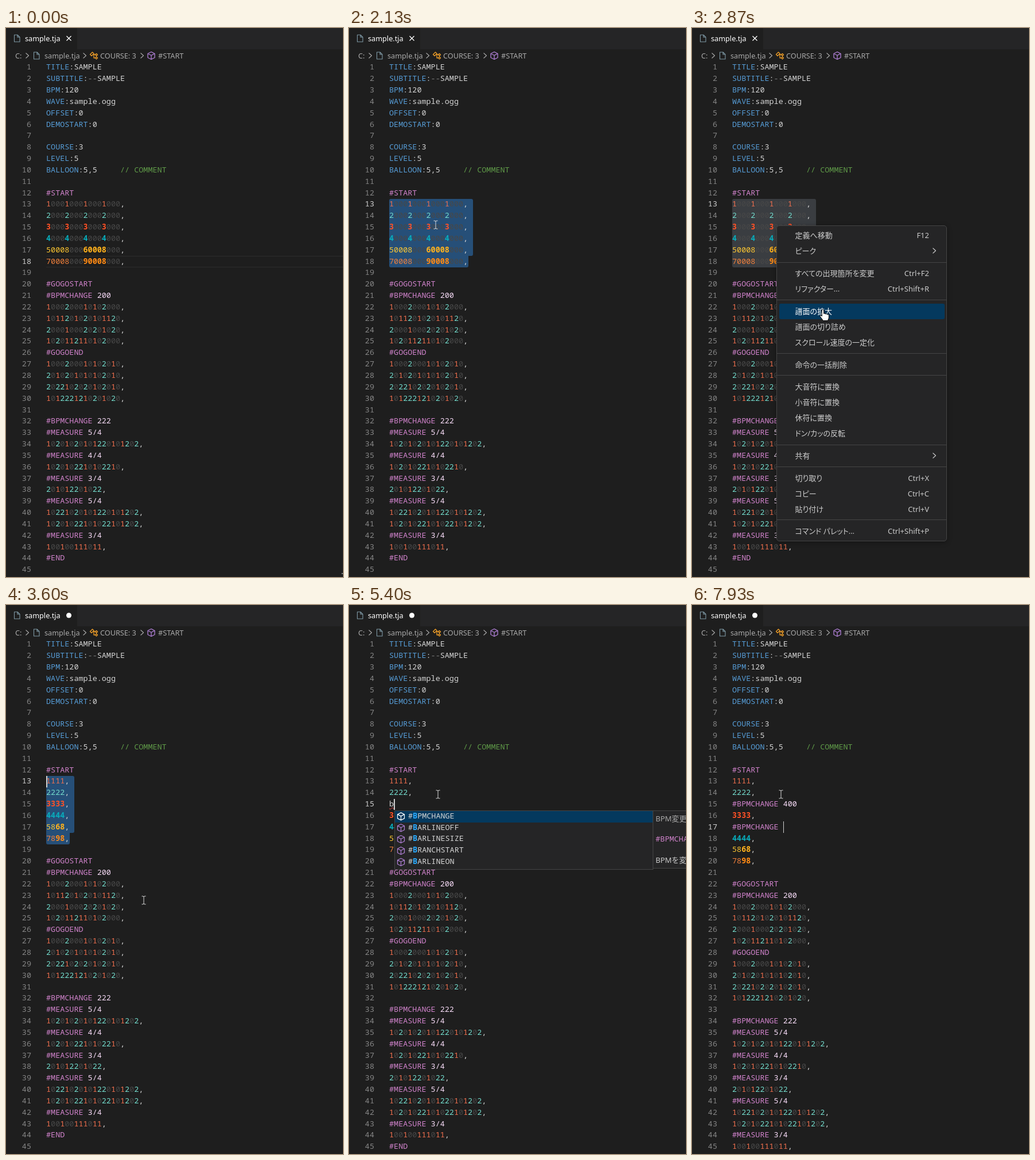
These frames come from a looping animation (587x954 px, 8000 ms). An HTML page:

```html
<!DOCTYPE html>
<html lang="ja">
<head>
<meta charset="utf-8">
<title>Editor</title>
<style>
html, body { margin: 0; width: 100%; height: 100%; overflow: hidden; background: #1e1e1e; }
#stage { position: relative; width: 587px; height: 954px; overflow: hidden; background: #1e1e1e; }
#stage div, #stage svg { position: absolute; white-space: pre; box-sizing: border-box; }
.mono { font: 500 13.45px/19.84px "Noto Sans Mono", monospace; color: #d4d4d4; }
.ui { font: 12.7px/20px "Noto Sans", "Noto Sans CJK JP", sans-serif; color: #a9a9a9; }
.item { font-size: 13px; color: #ccc; font-feature-settings: "palt"; }
.key { color: #569cd6; } .dash { color: #808080; } .comment { color: #5f9a48; }
.cmd { color: #cf82ca; } .arg { color: #f8dcf8; }
.bad { text-decoration: underline wavy #f14c4c 1px; }
.n0 { color: #484848; font-weight: 400; } .n1 { color: #f2704f; } .n2 { color: #74dccd; }
.n3 { color: #ff5126; font-weight: bold; } .n4 { color: #08aebd; font-weight: bold; }
.n5 { color: #ffc832; } .n6 { color: #ffb11c; font-weight: bold; }
.n7 { color: #f0803c; } .n9 { color: #ff8a14; font-weight: bold; }
.match { color: #2aaaff; font-weight: bold; }
.box { background: #252526; border: 1px solid #454545; }
</style>
</head>
<body>
<div id="stage"></div>
<script>
const stage = document.getElementById('stage');
const TICK = 1000 / 15, TICKS = 120;
const TOP = 58.9, ROW = 19.84, LEFT = 70, CHAR = 8.07;

const HEAD = `TITLE:SAMPLE
SUBTITLE:--SAMPLE
BPM:120
WAVE:sample.ogg
OFFSET:0
DEMOSTART:0

COURSE:3
LEVEL:5
BALLOON:5,5     // COMMENT

#START`.split('\n');
const NOTES = ['1000100010001000,', '2000200020002000,', '3000300030003000,',
  '4000400040004000,', '5000800060008000,', '7000800090008000,'];
const SHORT = NOTES.map(s => [...s].filter((c, i) => i % 4 === 0).join(''));
const TAIL = `
#GOGOSTART
#BPMCHANGE 200
1000200010102000,
1011201020101120,
2000100020201020,
1020112110102000,
#GOGOEND
1000200010102010,
2010201010102010,
2022102020102010,
1012221210201020,

#BPMCHANGE 222
#MEASURE 5/4
10201020101220101202,
#MEASURE 4/4
1020102210102210,
#MEASURE 3/4
201012201022,
#MEASURE 5/4
10221020101220101202,
10201022101022101202,
#MEASURE 3/4
100100111011,
#END
`.split('\n');

// [tick, text] for the two inserted lines
const FIRST = [[76, ''], [81, 'b'], [83, 'bp'], [84, 'bpm'], [89, '#BPMCHANGE '],
  [94, '#BPMCHANGE 4'], [95, '#BPMCHANGE 40'], [97, '#BPMCHANGE 400']];
const SECOND = [[105, ''], [112, 'b'], [113, 'bp'], [114, 'bpm'], [118, '#BPMCHANGE ']];
const COMMANDS = ['BPMCHANGE', 'BARLINEOFF', 'BARLINESIZE', 'BRANCHSTART', 'BARLINEON'];

// [tick, x, y] of the pointer
const PATH = [[0, 588, 955], [12, 224, 406], [17, 224, 406], [25, 62, 306], [28, 62, 306],
  [29, 59, 294], [32, 151, 342], [39, 151, 342], [40, 162, 366], [44, 240, 513],
  [58, 240, 513], [65, 155, 329], [120, 155, 329]];

// [centre y, label, shortcut]; '>' marks a submenu
const MENU = [[360, '定義へ移動', 'F12'], [387, 'ピーク', '>'],
  [426.5, 'すべての出現箇所を変更', 'Ctrl+F2'], [453.5, 'リファクター...', 'Ctrl+Shift+R'],
  [492, '譜面の拡大'], [519, '譜面の切り詰め'], [546, 'スクロール速度の一定化'],
  [585, '命令の一括削除'],
  [623, '大音符に置換'], [650, '小音符に置換'], [677, '休符に置換'], [704, 'ドン/カッの反転'],
  [743, '共有', '>'],
  [782, '切り取り', 'Ctrl+X'], [809, 'コピー', 'Ctrl+C'], [836, '貼り付け', 'Ctrl+V'],
  [874, 'コマンド パレット...', 'Ctrl+Shift+P']];
const RULES = [407, 472, 565, 603, 724, 762, 854];

const rowTop = row => TOP + row * ROW;
const colX = col => LEFT + col * CHAR;
const span = (cls, s) => `<span class="${cls}">${s}</span>`;
const block = (x, y, w, h, style = '', cls = '') =>
  `<div class="${cls}" style="left:${x}px;top:${y}px;width:${w}px;height:${h}px;${style}"></div>`;
const mono = (x, y, s) => `<div class="mono" style="left:${x}px;top:${y - 0.6}px">${s}</div>`;
const label = (x, cy, s, style = '', cls = '') =>
  `<div class="ui ${cls}" style="left:${x}px;top:${cy - 10.4}px;${style}">${s}</div>`;
const shape = (x, y, d, stroke, width = 1.1, fill = 'none') =>
  `<path transform="translate(${x} ${y})" d="${d}" stroke="${stroke}" stroke-width="${width}" fill="${fill}" stroke-linejoin="round"/>`;
const svg = s => `<svg width="587" height="954" style="left:0;top:0">${s}</svg>`;

const FILE = 'M-4.5-6h5.5l4 4v8h-9.5zM1-6v4h4';
const CHEVRON = 'M-2.5-4.5 2.5 0-2.5 4.5';
const CUBE = 'M0-6.5 6-3.5V3.5L0 6.5-6 3.5V-3.5ZM-6-3.5 0-.5 6-3.5M0-.5V6.5';
const TREE = 'M-6.5-2l4-4 2.5 2.5-4 4zM-1.5-2H3M0-2v6H3M2.5-1.5l2-2 2 2-2 2zM2.5 4l2-2 2 2-2 2z';
const IBEAM = 'M-3.5-7H-1L0-6 1-7H3.5M0-6V6M-3.5 7H-1L0 6 1 7H3.5';
const HAND = 'M-1.6.8C-1.6-1.2 1.8-1.2 1.8.8V6.5C2.3 5.6 4.6 5.8 4.8 7.2 5.5 6.2 7.6 6.6 7.8 8 8.8 7.2 10.6 7.8 10.6 9.4V13C10.6 15 9 16 9 18.5H0C0 16.5-2.4 14.5-4.6 11.2-5.6 9.4-3.6 8.4-2.6 9.6L-1.6 10.8Z';

function paintNotes(line) {
  let roll = '';
  return [...line].map(c => {
    if ('5679'.includes(c)) roll = c;
    const html = span(c === ',' ? '' : 'n' + (roll || c), c);
    if (c === '8') roll = '';
    return html;
  }).join('');
}

function paintLine(line) {
  if (/^\d/.test(line)) return paintNotes(line);
  if (/^b/.test(line)) return span('bad', line);
  if (line[0] === '#') return line.replace(/^(#\w+)(.*)/, (m, a, b) => span('cmd', a) + span('arg', b));
  const colon = line.indexOf(':');
  if (colon < 0) return line;
  return span('key', line.slice(0, colon)) + line.slice(colon)
    .replace(/\/\/.*/, m => span('comment', m))
    .replace('--', m => span('dash', m));
}

function pointerAt(k) {
  const i = Math.max(1, PATH.findIndex(p => p[0] >= k));
  const [t0, x0, y0] = PATH[i - 1], [t1, x1, y1] = PATH[i];
  const u = (k - t0) / (t1 - t0), e = u * u * (3 - 2 * u);
  return { x: x0 + (x1 - x0) * e, y: y0 + (y1 - y0) * e };
}

const typed = (steps, k) => steps.filter(s => s[0] <= k).pop()?.[1];

function caretAt(k, mouse, lines) {
  if (k < 18) return { row: 17, col: 17 };
  if (k <= 25) return {
    row: Math.min(17, Math.max(12, Math.floor((mouse.y - TOP) / ROW))),
    col: Math.min(17, Math.max(0, Math.round((mouse.x - LEFT) / CHAR)))
  };
  if (k < 66) return { row: 12, col: 0 };
  const row = k < 76 ? 13 : k < 102 ? 14 : k < 105 ? 15 : 16;
  return { row, col: lines[row].length };
}

function header(k, error) {
  const icons = shape(19, 18, FILE, '#7f9aa6') + shape(53, 48, FILE, '#7f9aa6') +
    [37, 137, 237].map(x => shape(x, 48, CHEVRON, '#a9a9a9')).join('') +
    shape(153, 48, TREE, '#ee9d28', 1.3) + shape(253, 48, CUBE, '#b180d7', 1.3) +
    (k < 54 ? shape(109.5, 18, 'M-4-4 4 4M4-4-4 4', '#fff', 1.3)
            : '<circle cx="109.5" cy="18" r="4.5" fill="#fff"/>');
  return block(124, 0, 463, 37, 'background:#252526') +
    label(33, 18.5, 'sample.tja', `color:${error ? '#f88070' : '#fff'}`) +
    label(16, 48.5, 'C:') + label(67, 48.5, 'sample.tja') +
    label(164, 48.5, 'COURSE: 3') + label(265, 48.5, '#START') + svg(icons);
}

function selection(k, caret, lines) {
  if (k < 18 || k >= 66) return '';
  const color = k >= 36 && k < 54 ? '#3a3d41' : '#264f78';
  let html = '';
  for (let row = caret.row; row <= 17; row++) {
    const from = colX(row === caret.row ? caret.col : 0);
    const to = Math.ceil(colX(lines[row].length + (row < 17 ? 1 : 0)));
    const top = row === caret.row ? 3 : 0;
    const right = row >= 16 ? 3 : 0, left = row === 17 ? 3 : 0;
    html += block(from, rowTop(row), to - from, ROW + 0.3,
      `background:${color};border-radius:${top}px ${top}px ${right}px ${left}px`);
  }
  return html;
}

function suggestions(row, word) {
  const y = Math.ceil(rowTop(row + 1));
  const found = COMMANDS.filter(c => c.startsWith(word.toUpperCase()));
  let html = block(79, y, 451, found.length * ROW + 3.5, '', 'box') +
    block(80, y + 1, 449, ROW, 'background:#04395e') +
    block(529, y, 80, 101, '', 'box');
  found.forEach((name, i) => {
    const n = word.length, top = y + 0.4 + i * ROW;
    html += mono(103, top, '#' + span('match', name.slice(0, n)) + name.slice(n)) +
      svg(shape(90.5, top + 10, CUBE, i ? '#b180d7' : '#fff', 1.2));
  });
  return html + label(534, y + 14, 'BPM変更', 'font-size:13px') +
    mono(534, y + 41, span('cmd', '#BPMCHANGE')) +
    label(534, y + 86.5, 'BPMを変更します。', 'font-size:13px;color:#ccc');
}

function menu(mouse, hovering) {
  let html = block(147, 342.5, 297, 549.5, 'border-radius:5px;box-shadow:0 2px 8px rgba(0,0,0,.36)', 'box');
  for (const y of RULES) html += block(148, y, 295, 1, 'background:#454545');
  for (const [y, name, key] of MENU) {
    const hot = hovering && Math.abs(mouse.y - y) <= 13.5;
    const color = hot ? 'color:#fff;' : '';
    if (hot) html += block(152, y - 13.5, 288, 27.5, 'background:#04395e;border-radius:3px');
    html += label(179.5, y, name, color, 'item');
    if (key === '>') html += svg(shape(422, y, CHEVRON, '#ccc'));
    else if (key) html += label('auto;right:174', y, key, color, 'item');
  }
  return html;
}

function draw(k) {
  const mouse = pointerAt(k);
  const first = typed(FIRST, k), second = typed(SECOND, k);
  const lines = [...HEAD, ...(k < 54 ? NOTES : SHORT)];
  if (first !== undefined) lines.splice(14, 0, first);
  if (second !== undefined) lines.splice(16, 0, second);
  lines.push(...TAIL);

  const caret = caretAt(k, mouse, lines);
  const word = lines[caret.row];
  const suggesting = word[0] === 'b';
  const error = (k >= 83 && k < 90) || (k >= 113 && k < 119);
  const caretOn = (k >= 15 && k < 32) || (k >= 54 && k < 73) || k >= 76;
  const lineLit = k < 18 || (k >= 66 && k < 81) || (k >= 102 && k < 112);

  let html = header(k, error);
  if (lineLit) html += block(LEFT, rowTop(caret.row), 530, ROW, 'border:solid #2c2c2c;border-width:1.5px 0');
  html += selection(k, caret, lines);
  lines.slice(0, 45).forEach((line, row) => {
    const number = String(row + 1), color = row === caret.row ? '#d0d0d0' : '#858585';
    html += mono(44 - number.length * CHAR, rowTop(row), `<span style="color:${color}">${number}</span>`) +
      mono(LEFT, rowTop(row), paintLine(line));
  });
  if (caretOn) html += block(colX(caret.col), rowTop(caret.row), 1.5, ROW, 'background:#d0d0d0');
  if (suggesting) html += suggestions(caret.row, word);
  const hand = k >= 40 && k < 54;
  if (k >= 34 && k < 54) html += menu(mouse, hand);
  html += svg(hand ? shape(mouse.x, mouse.y, HAND, '#000', 1, '#fff')
                   : shape(mouse.x, mouse.y, IBEAM, '#d8d8d8', 1));
  stage.innerHTML = html;
}

let shown = -1;
const start = performance.now();
function frame() {
  const k = Math.floor((performance.now() - start + 4) / TICK) % TICKS;
  if (k !== shown) draw(shown = k);
  requestAnimationFrame(frame);
}
frame();
</script>
</body>
</html>
```
